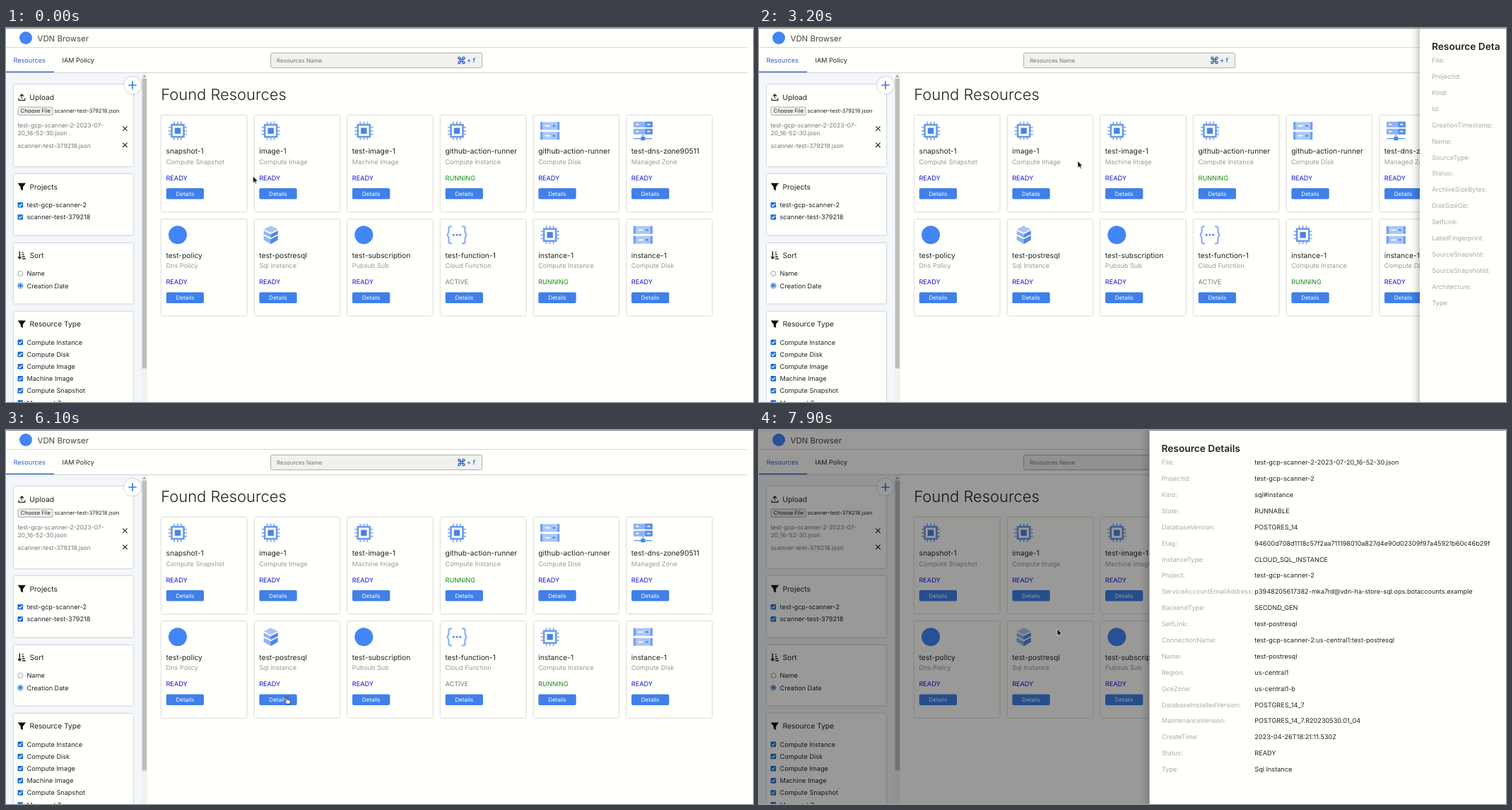
An HTML page that plays this animation: 1057x530 px, repeating every 8 s.

```html
<!DOCTYPE html>
<html lang="en">
<head>
<meta charset="utf-8">
<title>Resource scanner</title>
<style>
html, body { margin: 0; width: 100%; height: 100%; overflow: hidden; background: #fffffc; }
svg { display: block; }
#stage { width: 1057px; height: 530px; }
text { font-family: Inter, sans-serif; font-size: 9.14px; fill: #222; text-rendering: geometricPrecision; white-space: pre; }
.app { font-size: 11.43px; fill: #444; }
.h1 { font-size: 21.94px; font-weight: 300; }
.h2 { font-size: 13.71px; font-weight: 600; }
.h3 { font-size: 10.28px; }
.hint { font-size: 8px; fill: #757575; }
.ctl { font-size: 7.62px; }
.file { font-size: 8.57px; fill: #757575; }
.sub { fill: #999; }
.key { fill: #aaa; }
.tab, .keys { fill: #2f5fc9; }
.keys { font-weight: 500; }
.btn { font-size: 8px; fill: #fff; text-anchor: middle; }
.READY { fill: #1010d8; }
.RUNNING { fill: #148a14; }
.ACTIVE { fill: #777; }
.card { fill: #fffffc; filter: drop-shadow(0 .7px 1px rgba(0, 0, 0, .33)); }
.sheet { fill: #fffffc; filter: drop-shadow(0 0 7px rgba(0, 0, 0, .4)); }
.line { fill: none; stroke: #222; stroke-width: 1.1; }

#dim, #image, #sql, #cursor, #arrow, #hand { animation: 8s step-end infinite; }
#dim { animation-name: dim; }
#image { animation-name: image; }
#sql { animation-name: sql; }
#cursor { animation-name: move; }
#arrow { animation-name: arrow; }
#hand { animation-name: hand; }

@keyframes dim {
  0%, 40% { opacity: 0; }
  17.5%, 81.25%, 100% { opacity: .4; }
}
@keyframes image {
  0%, 43.75%, 100% { visibility: hidden; transform: translate(1057px, 0); }
  17.5% { visibility: visible; transform: translate(762px, 0); }
  18.75% { visibility: visible; transform: translate(691.5px, 0); }
  20% { visibility: visible; transform: translate(686px, 0); }
  40% { visibility: visible; transform: translate(935px, 0); }
  41.25% { visibility: visible; transform: translate(1040px, 0); }
}
@keyframes sql {
  0% { visibility: hidden; transform: translate(1057px, 0); }
  81.25% { visibility: visible; transform: translate(744px, 0); }
  82.5% { visibility: visible; transform: translate(586px, 0); }
  83.75%, 100% { visibility: visible; transform: translate(552.5px, 0); }
}
@keyframes move {
  0% { transform: translate(349.5px, 210px); }
  1.25% { transform: translate(350px, 208.5px); }
  2.5% { transform: translate(354px, 208px); }
  3.75% { transform: translate(364px, 213px); }
  5% { transform: translate(378px, 222px); }
  6.25% { transform: translate(390px, 232px); }
  7.5% { transform: translate(396px, 237.5px); }
  22.5% { transform: translate(405px, 226px); }
  23.75% { transform: translate(423px, 210px); }
  26.25% { transform: translate(451px, 188.5px); }
  47.5% { transform: translate(456px, 200px); }
  48.75% { transform: translate(478px, 240px); }
  50% { transform: translate(514px, 296px); }
  51.25% { transform: translate(560px, 352px); }
  52.5% { transform: translate(587px, 391px); }
  53.75% { transform: translate(552px, 391px); }
  55% { transform: translate(523px, 387px); }
  58.75% { transform: translate(522px, 386.5px); }
  61.25% { transform: translate(535px, 381.5px); }
  70% { transform: translate(492px, 378px); }
  71.25% { transform: translate(438px, 376px); }
  73.75% { transform: translate(416px, 377px); }
  75% { transform: translate(394px, 378px); }
  76.25% { transform: translate(396.5px, 378px); }
  81.25% { transform: translate(395.5px, 379px); }
  90% { transform: translate(397px, 372px); }
  91.25% { transform: translate(401px, 358px); }
  92.5% { transform: translate(405px, 342px); }
  93.75% { transform: translate(409px, 327px); }
  95% { transform: translate(413px, 312px); }
  96.25% { transform: translate(417px, 299px); }
  97.5% { transform: translate(420px, 288px); }
  98.75%, 100% { transform: translate(422px, 282px); }
}
@keyframes arrow {
  0%, 17.5%, 71.25%, 81.25%, 100% { visibility: visible; }
  6.25%, 55%, 75% { visibility: hidden; }
}
@keyframes hand {
  0%, 17.5%, 71.25%, 81.25%, 100% { visibility: hidden; }
  6.25%, 55%, 75% { visibility: visible; }
}
</style>
</head>
<body>
<svg id="stage" viewBox="0 0 1057 530">
  <defs>
    <g id="chip">
      <path d="M-5-13V13M0-13V13M5-13V13M-13-5H13M-13 0H13M-13 5H13" stroke="#8fb4f3" stroke-width="2"/>
      <rect x="-8.5" y="-8.5" width="17" height="17" fill="#fffffc" stroke="#6b9bee" stroke-width="2.6"/>
      <rect x="-4.2" y="-4.2" width="8.4" height="8.4" fill="#4a82e4"/>
    </g>
    <g id="disk">
      <path d="M-13.5-12.5h27v11h-27zM-13.5 1.5h27v11h-27z" fill="#a9c7f8"/>
      <path d="M-13.5-12.5h3v11h-3zM10.5-12.5h3v11h-3zM-13.5 1.5h3v11h-3zM10.5 1.5h3v11h-3z" fill="#6f9ff0"/>
      <path d="M-7-7h7M-7 7h7" stroke="#fff" stroke-width="1.8"/>
      <path d="M4-7h3M4 7h3" stroke="#4a82e4" stroke-width="2.6"/>
    </g>
    <g id="zone">
      <path d="M-13.5-13h27v8h-27zM-13.5-3h27v8h-27z" fill="#8fb4f3"/>
      <path d="M3-13h10.5v8H3zM3-3h10.5v8H3z" fill="#5d90ea"/>
      <path d="M-10-9h4M-10 1h4M6-9h4M6 1h4" stroke="#fff" stroke-width="1.8"/>
      <path d="M0 5v6M-13 11h26" stroke="#6f9ff0" stroke-width="1.6"/>
      <path d="M-3 8.5h6v5h-6z" fill="#4a82e4"/>
    </g>
    <g id="stack">
      <path d="M-10-8L0-13 10-8 0-3z" fill="#a9c7f8"/>
      <path d="M-10-6L0-1 10-6V-1L0 4-10-1zM-10 1L0 6 10 1V7L0 13-10 7z" fill="#8fb4f3"/>
      <path d="M0-1L10-6V-1L0 4zM0 6L10 1V7L0 13z" fill="#5387e6"/>
    </g>
    <g id="func">
      <path d="M-7-12h-2q-2.500 0-2.500 3v5l-2 4 2 4v5q0 3 2.500 3h2M7-12h2q2.500 0 2.500 3v5l2 4-2 4v5q0 3-2.500 3h-2" fill="none" stroke="#8fb4f3" stroke-width="2.300"/>
      <path d="M-6-1.300h2.600v2.600H-6zM-1.300-1.300h2.600v2.600h-2.600zM3.400-1.300H6v2.600H3.400z" fill="#4a82e4"/>
    </g>
    <circle id="dot" r="13" fill="#4285f4"/>
    <path id="funnel" d="M-5.700-5.200H5.700L1.600.4V5.400L-1.600 3.600V.4z" fill="#111"/>
    <path id="close" class="line" d="M-3.200-3.200L3.200 3.200M3.200-3.200L-3.200 3.200"/>
    <g id="check">
      <rect x="-3.800" y="-3.800" width="7.600" height="7.600" rx="1.200" fill="#1a6fd8"/>
      <path d="M-2.200 0L-.6 1.700 2.300-1.800" fill="none" stroke="#fff" stroke-width="1.200"/>
    </g>
  </defs>
  <svg id="page" width="1049" height="530"></svg>
  <rect width="1057" height="1" fill="#8a8a88"/>
  <g id="cursor">
    <path id="arrow" d="M0 0V9.500L2.200 7.500 3.700 11 5.200 10.300 3.800 7.100H6.800z" fill="#111" stroke="#fff" stroke-width=".6"/>
    <path id="hand" d="M-.3.500Q.5-.6 1.300.5V4L5 4.700Q6.300 5 6.200 6.500L5.400 10.300H.6L-2.300 6.800Q-2.500 5.300-.3 6.400z" fill="#fff" stroke="#111" stroke-width=".8"/>
  </g>
</svg>
<script>
const text = (x, y, s, cls = '') => `<text x="${x}" y="${y}" class="${cls}">${s}</text>`;
const rect = (x, y, w, h, attrs) => `<rect x="${x}" y="${y}" width="${w}" height="${h}" ${attrs}/>`;
const icon = (id, x, y) => `<use href="#${id}" x="${x}" y="${y}"/>`;
const path = (d, attrs) => `<path d="${d}" ${attrs}/>`;
const box = (y, h) => rect(11, y, 169, h, 'rx="1.5" class="card"');
const checks = (y, names) => names.map((s, i) =>
  icon('check', 20.3, y - 3.4 + i * 17.15) + text(29.5, y + i * 17.15, s)).join('');

const header =
  rect(0, 0, 1049, 530, 'fill="#fffffc"') +
  rect(0, 27.2, 1049, .9, 'fill="#d0d0ce"') +
  '<circle cx="28" cy="14" r="9" fill="#4285f4"/>' +
  text(44.5, 18.6, 'VDN Browser', 'app') +
  text(10.5, 48.8, 'Resources', 'tab') +
  text(79.5, 48.8, 'IAM Policy') +
  rect(374.6, 35.4, 299, 21, 'rx="2" fill="#f1f2ee" stroke="#a5a5a3" stroke-width=".9"') +
  text(383, 49.3, 'Resources Name', 'hint') +
  '<g transform="translate(638.2 39.600) scale(.52)" fill="none" stroke="#2f5fc9" stroke-width="2.600">' +
  path('M18 3a3 3 0 0 0-3 3v12a3 3 0 1 0 3-3H6a3 3 0 1 0 3 3V6a3 3 0 1 0-3 3h12a3 3 0 0 0 0-6z', '') + '</g>' +
  text(652, 49.3, '+ f', 'keys');

const sidebar =
  rect(0, 63.5, 200, 467, 'fill="#f3f6fa"') +
  rect(191.5, 63.5, 8.5, 467, 'fill="#f0f1f1"') +
  rect(192.6, 71.5, 6.4, 411, 'fill="#bdbebe"') +
  path('M193.700 69.200L195.700 66.800 197.700 69.200z', 'fill="#777"') +
  rect(0, 62.8, 1049, .9, 'fill="#cdcecd"') +
  rect(0, 61.6, 68, 1.4, 'fill="#2f5fc9"') +
  box(80, 116) + box(207, 86.5) + box(305, 85.5) + box(402, 140) +
  '<circle cx="179" cy="81" r="12" class="card"/>' +
  path('M173.300 81h11.400M179 75.300v11.400', 'stroke="#3b78e7" stroke-width="1.700"') +
  path('M18 99.200v3.200h8.800v-3.200M22.400 99.800v-5.800M19.600 96.800l2.800-2.900 2.800 2.900', 'class="line"') +
  text(33.3, 101.6, 'Upload', 'h3') +
  rect(17, 112, 49, 11.4, 'rx="1.5" fill="#efefee" stroke="#777" stroke-width=".6"') +
  text(20.6, 120.4, 'Choose File', 'ctl') +
  text(68.6, 120.4, 'scanner-test-379218.json', 'ctl') +
  text(16.4, 141, 'test-gcp-scanner-2-2023-07-', 'file') +
  text(16.4, 151.9, '20_16-52-30.json', 'file') +
  text(16.4, 169.6, 'scanner-test-379218.json', 'file') +
  icon('close', 168.4, 142.6) + icon('close', 168.4, 165.8) +
  icon('funnel', 22.3, 225) + text(33.5, 228.6, 'Projects', 'h3') +
  checks(254.2, ['test-gcp-scanner-2', 'scanner-test-379218']) +
  path('M19.300 316.500v10M17 324.300l2.300 2.600 2.300-2.600M23 318h1.600M23 321h2.600M23 324h3.800M23 327h5', 'class="line" style="stroke-width:1.500"') +
  text(33.5, 325.7, 'Sort', 'h3') +
  '<circle cx="20.300" cy="348" r="3.500" fill="#fff" stroke="#777" stroke-width=".7"/>' +
  '<circle cx="20.300" cy="365.200" r="3.500" fill="#fff" stroke="#1a6fd8" stroke-width="1"/>' +
  '<circle cx="20.300" cy="365.200" r="2.100" fill="#1a6fd8"/>' +
  text(29.5, 351.4, 'Name') + text(29.5, 368.6, 'Creation Date') +
  icon('funnel', 22.3, 419.6) + text(33.5, 423.2, 'Resource Type', 'h3') +
  checks(448.8, ['Compute Instance', 'Compute Disk', 'Compute Image', 'Machine Image', 'Compute Snapshot', 'Managed Zone']);

const resources = [
  ['chip', 'snapshot-1', 'Compute Snapshot'],
  ['chip', 'image-1', 'Compute Image'],
  ['chip', 'test-image-1', 'Machine Image'],
  ['chip', 'github-action-runner', 'Compute Instance', 'RUNNING'],
  ['disk', 'github-action-runner', 'Compute Disk'],
  ['zone', 'test-dns-zone90511', 'Managed Zone'],
  ['dot', 'test-policy', 'Dns Policy'],
  ['stack', 'test-postresql', 'Sql Instance'],
  ['dot', 'test-subscription', 'Pubsub Sub'],
  ['func', 'test-function-1', 'Cloud Function', 'ACTIVE'],
  ['chip', 'instance-1', 'Compute Instance', 'RUNNING'],
  ['disk', 'instance-1', 'Compute Disk']
];
const card = ([pic, name, kind, state = 'READY'], i) =>
  `<g transform="translate(${220 + i % 6 * 131.67} ${123.7 + Math.floor(i / 6) * 147.6})">` +
  rect(0, 0, 120.4, 136.5, 'rx="1" class="card"') +
  icon(pic, 23, 22) +
  text(6.5, 54.7, name, 'h3') +
  text(6.5, 69.2, kind, 'sub') +
  text(6.5, 92.1, state, state) +
  rect(6.7, 103.2, 53.3, 15.6, 'rx="2" fill="#4080e8"') +
  text(33.3, 113.9, 'Details', 'btn') + '</g>';

const panel = (id, rows) => `<g id="${id}">` +
  rect(0, -20, 520, 570, 'class="sheet"') +
  text(17, 31, 'Resource Details', 'h2') +
  rows.trim().split('\n').map((row, i) => {
    const [key, value] = row.trim().split(' = ');
    const y = 49.3 + i * 22.88;
    return text(17.2, y, key + ':', 'key') + text(148.8, y, value);
  }).join('') + '</g>';

const imageRows = `
  File = test-gcp-scanner-2-2023-07-20_16-52-30.json
  ProjectId = test-gcp-scanner-2
  Kind = compute#image
  Id = 897770686236644397
  CreationTimestamp = 2023-04-26T11:17:39.438-07:00
  Name = image-1
  SourceType = RAW
  Status = READY
  ArchiveSizeBytes = 538269312
  DiskSizeGb = 10
  SelfLink = image-1
  LabelFingerprint = 42WmSpB8rSM=
  SourceSnapshot = snapshot-1
  SourceSnapshotId = 3062630818433520762
  Architecture = X86_64
  Type = Compute Image`;
const sqlRows = `
  File = test-gcp-scanner-2-2023-07-20_16-52-30.json
  ProjectId = test-gcp-scanner-2
  Kind = sql#instance
  State = RUNNABLE
  DatabaseVersion = POSTGRES_14
  Etag = 94600d708d1118c57f2aa711198010a827d4e90d02309f97a45921b60c46b29f
  InstanceType = CLOUD_SQL_INSTANCE
  Project = test-gcp-scanner-2
  ServiceAccountEmailAddress = p3948205617382-mka7rd@vdn-ha-store-sql.ops.botaccounts.example
  BackendType = SECOND_GEN
  SelfLink = test-postresql
  ConnectionName = test-gcp-scanner-2:us-central1:test-postresql
  Name = test-postresql
  Region = us-central1
  GceZone = us-central1-b
  DatabaseInstalledVersion = POSTGRES_14_7
  MaintenanceVersion = POSTGRES_14_7.R20230530.01_04
  CreateTime = 2023-04-26T18:21:11.530Z
  Status = READY
  Type = Sql Instance`;

document.getElementById('page').innerHTML =
  header + sidebar +
  text(219.2, 101.5, 'Found Resources', 'h1') +
  resources.map(card).join('') +
  rect(0, 0, 1049, 530, 'id="dim"') +
  panel('image', imageRows) + panel('sql', sqlRows);
</script>
</body>
</html>
```
